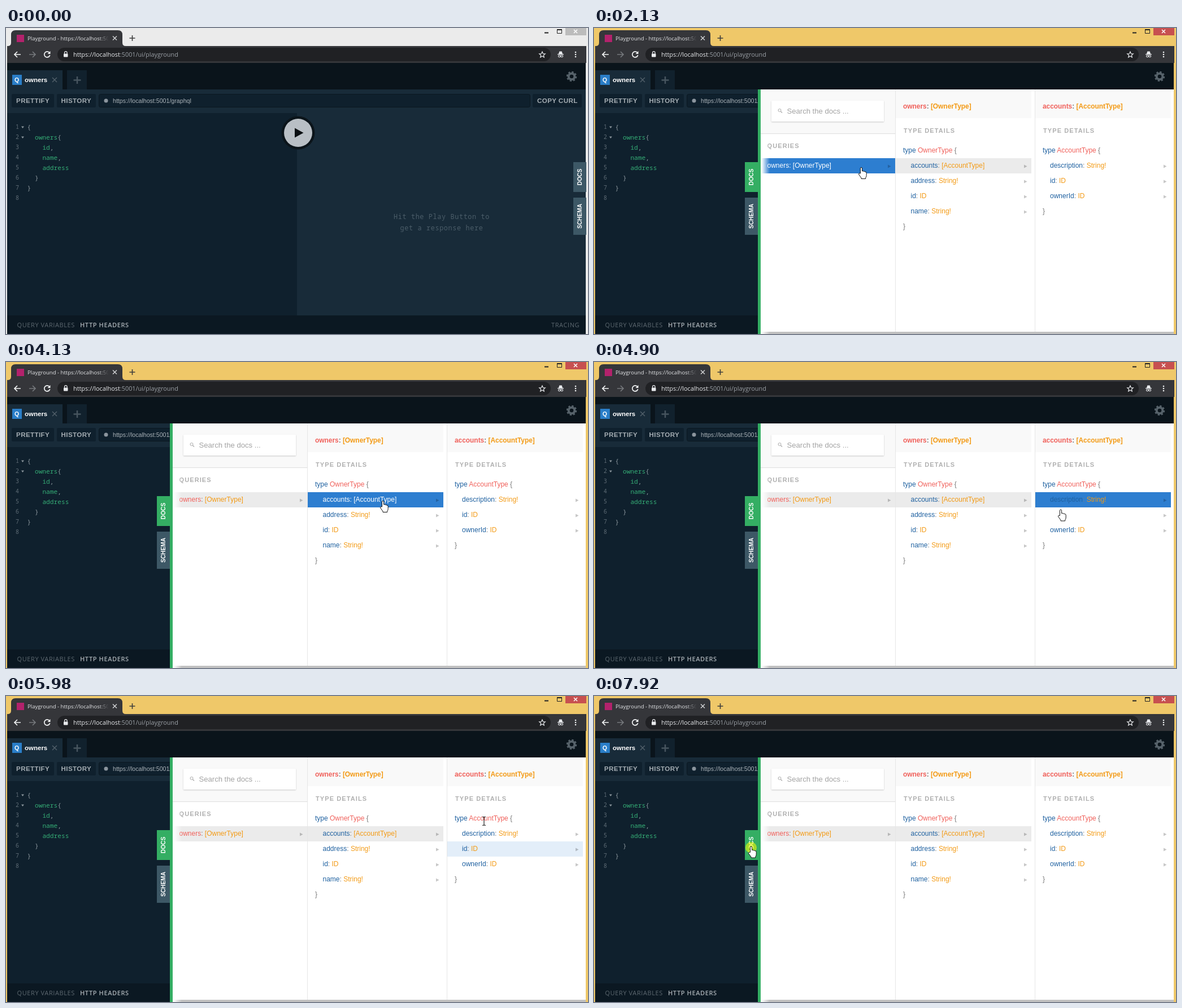
Recreate the animation shown at these times as an HTML page. Size 1030x543 px, loop 7990 ms.

```html
<!DOCTYPE html>
<html lang="en">
<head>
<meta charset="utf-8">
<title>Playground docs</title>
<style>
html, body { margin: 0; width: 100%; height: 100%; overflow: hidden; }
svg { display: block; width: 1030px; height: 543px; font-family: "Liberation Sans", Arial, sans-serif; }
.ui { font-family: "Open Sans", "Noto Sans", sans-serif; }
.mono { font-family: "Noto Sans Mono", monospace; }
.bold { font-weight: 700; }
.semi { font-weight: 600; }
.button { font-weight: 700; letter-spacing: .4px; }
.footer { font-family: "Open Sans", sans-serif; letter-spacing: .6px; }
.heading { font-weight: 700; letter-spacing: 1.1px; }
.hint { font-family: "Noto Sans Mono", monospace; letter-spacing: .65px; text-anchor: middle; }
.side { font-weight: 700; text-anchor: middle; }
.hot tspan { fill: #fff; }
</style>
</head>
<body>
<svg id="stage" viewBox="0 0 1030 543"></svg>
<script>
const LOOP = 7990, STEP = 76.9, FIRST = 430;
const ACTIVATE = 9, OPEN = 11;
const RED = '#f0605a', ORANGE = '#f39a14', BLUE = '#1f61a0', GREEN = '#34ae63', GREY = '#777';

const rect = (x, y, x2, y2, fill, extra = '') =>
  `<rect x="${x}" y="${y}" width="${x2 - x}" height="${y2 - y}" fill="${fill}" ${extra}/>`;
const circle = (x, y, r, fill, extra = '') => `<circle cx="${x}" cy="${y}" r="${r}" fill="${fill}" ${extra}/>`;
const line = (d, stroke, width = 1, extra = '') =>
  `<path d="${d}" fill="none" stroke="${stroke}" stroke-width="${width}" ${extra}/>`;
const shape = (d, fill, extra = '') => `<path d="${d}" fill="${fill}" ${extra}/>`;
const text = (x, y, content, size, fill, cls = '', extra = '') =>
  `<text x="${x}" y="${y}" font-size="${size}" fill="${fill}" class="${cls}" ${extra}>${content}</text>`;
const span = (content, fill) => `<tspan fill="${fill}">${content}</tspan>`;
const field = (name, type, color) => span(name, color) + span(': ', GREY) + span(type, ORANGE);

function browser() {
  return rect(0, 0, 1030, 543, '#ebebeb', 'id="frame"') +
    rect(990, 0, 1027, 13, '#bcbcbc', 'id="close"') +
    line('M1005 3l6 6M1011 3l-6 6', '#fff', 1.5) +
    line('M953 8.5h7', '#222', 2) + line('M975.5 3v6.5h8V3z', '#222') + line('M975 3h9', '#222', 2) +
    shape('M3 32q6 0 6-6V12q0-8 8-8H198q8 0 8 8V26q0 6 6 6z', '#35363a') +
    rect(2, 32, 1027, 62, '#35363a') +
    rect(19, 12, 32, 25, '#b3226c') +
    text(38, 21.5, 'Playground - https://localhost:50', 9.55, '#e4e6e8', 'ui') +
    rect(164, 8, 185, 28, 'url(#tabFade)') +
    line('M189 14.5l7 7M196 14.5l-7 7', '#d5d7d9', 1.4) +
    line('M218.500 18h10M223.500 13v10', '#3c3c3c', 1.6) +
    line('M26 47H15.500M20 42l-5 5 5 5', '#f1f3f4', 1.7) +
    line('M41 47H51.500M47 42l5 5-5 5', '#75787c', 1.7) +
    line('M76.500 43.500A5 5 0 1 0 77.700 48', '#f1f3f4', 1.7) + shape('M78.500 41v5h-5z', '#f1f3f4') +
    rect(91, 35, 964, 59, '#202124', 'rx="12"') +
    rect(102, 45.500, 109.500, 51.500, '#e8eaed', 'rx="1"') +
    line('M103.500 46v-2a2.300 2.300 0 0 1 4.600 0v2', '#e8eaed', 1.2) +
    text(119, 51, span('https://localhost', '#e8eaed') + span(':5001/ui/playground', '#9aa0a6'), 10.9, '', 'ui') +
    line('M949 42l1.500 3.500 3.800.300-2.900 2.500.900 3.700-3.300-2-3.300 2 .900-3.700-2.900-2.500 3.800-.300z', '#e8eaed', 1.2) +
    shape('M978 46l1.300-4.500h4.400L985 46zM976 46h11v1.300H976z', '#e8eaed') +
    line('M979.300 48.200a1.800 1.800 0 1 0 .100 0M983.700 48.200a1.800 1.800 0 1 0 .100 0', '#e8eaed', 1.1) +
    [43, 47, 51].map(y => circle(1008, y, 1.3, '#f1f3f4')).join('');
}

function editor() {
  const code = [
    [0, span('{', '#8b959d')],
    [2, span('owners', '#35ad76') + span('{', '#8b959d')],
    [4, span('id', '#35ad76') + span(',', '#8b959d')],
    [4, span('name', '#35ad76') + span(',', '#8b959d')],
    [4, span('address', '#35ad76')],
    [2, span('}', '#8b959d')],
    [0, span('}', '#8b959d')],
    [0, '']
  ];
  return rect(2, 151, 515, 510, '#0f202d') + rect(515, 151, 1026, 510, '#182b39') +
    code.map(([indent, content], i) =>
      text(17, 178.500 + 18 * i, i + 1, 10, '#5f6c76', 'mono') +
      text(37.500 + 6.72 * indent, 180 + 18 * i, content, 11.2, '', 'mono')).join('') +
    [176, 194].map(y => shape(`M27 ${y - 1.5}h5l-2.500 3.500z`, '#8b959d')).join('') +
    text(771, 339, 'Hit the Play Button to', 11.8, '#4b5d69', 'hint') +
    text(771, 359, 'get a response here', 11.8, '#4b5d69', 'hint') +
    circle(517, 186, 29.5, '#0b141a') + circle(517, 186, 25, '#b9bfc5') +
    shape('M511 177.500v17l15.500-8.500z', '#0b0f12');
}

function playground() {
  const button = (x, x2, tx, label) => rect(x, 117, x2, 141, '#0f202d', 'rx="2"') +
    text(tx, 132.500, label, 11.6, '#a5adb3', 'button');
  return rect(2, 62, 1026, 109, '#0a141b') +
    rect(2, 75, 100, 109, '#182b39') + rect(11, 83, 28, 101, '#2a7ec8') +
    text(15, 96, 'Q', 10.5, '#fff', 'bold') + text(33, 96, 'owners', 11.5, '#fff', 'bold') +
    line('M82 88l8 8M90 88l-8 8', '#54626c', 1.4) +
    rect(108, 75, 143, 109, '#11212d') + line('M119.500 92.500h13M126 86v13', '#47555f', 2.5) +
    circle(1001, 86, 5.3, 'none', 'stroke="#56626a" stroke-width="4"') +
    circle(1001, 86, 7.7, 'none', 'stroke="#56626a" stroke-width="3" stroke-dasharray="3.200 2.848"') +
    rect(2, 109, 1026, 151, '#182b39') +
    button(10, 85, 18, 'PRETTIFY') + button(90, 159, 97.5, 'HISTORY') + button(932, 1019, 940, 'COPY CURL') +
    rect(164.5, 117.5, 927.5, 140.5, '#0f202d', 'rx="3" stroke="#0a1720"') +
    circle(177, 129, 4, '#8b959e', 'id="pulse"') + circle(177, 129, 3.5, '#8b959e') +
    text(189, 132.500, 'https://localhost:5001/graphql', 10.64, '#a9b1b7') +
    editor() +
    rect(2, 510, 1026, 543, '#0b1822') +
    text(19.500, 530.500, 'QUERY VARIABLES', 11, '#5d6870', 'footer') +
    text(131, 530.500, 'HTTP HEADERS', 11, '#a9b0b5', 'footer semi') +
    text(965, 530.500, 'TRACING', 11, '#5d6870', 'footer');
}

// x, right edge, y, text x, name, type, name colour, selected
const rows = [
  [295, 533, 231, 306.5, 'owners', '[OwnerType]', RED, 1],
  [534, 774, 231, 560.5, 'accounts', '[AccountType]', BLUE, 1],
  [534, 774, 258, 560.5, 'address', 'String!', BLUE],
  [534, 774, 285, 560.5, 'id', 'ID', BLUE],
  [534, 774, 312, 560.5, 'name', 'String!', BLUE],
  [781, 1021, 231, 807, 'description', 'String!', BLUE],
  [781, 1021, 258, 807, 'id', 'ID', BLUE],
  [781, 1021, 285, 807, 'ownerId', 'ID', BLUE]
];

function row([x, x2, y, tx, name, type, color, selected]) {
  return '<g class="row">' + rect(x, y, x2, y + 27, selected ? '#ebebeb' : '#fff') +
    rect(x, y, x2, y + 27, '#2d7ed0', 'opacity="0" class="glow"') +
    text(tx, y + 17, field(name, type, color), 12) +
    shape(`M${x2 - 13} ${y + 11.500}v6l5.500-3z`, '#000', 'opacity=".22"') + '</g>';
}

function docs() {
  const column = (x, name, type, end) => rect(x, 109, x + 240, 160, '#f9f9f9') +
    text(x + 13, 143, field(name, `[${type}]`, RED), 11.9, '', 'bold') +
    text(x + 14, 186, 'TYPE DETAILS', 11, '#b0b0b0', 'heading') +
    text(x + 13, 221, span('type ', BLUE) + span(type, RED) + span(' {', GREY), 12) +
    text(x + 13, end, '}', 12, GREY);
  return rect(295, 109, 1026, 543, '#fff') + rect(295, 109, 533, 187, '#f9f9f9') +
    line('M295 187.500H533', '#dedede') +
    rect(314, 129, 513, 166, '#fff', 'rx="1" filter="url(#soft)"') +
    circle(328.5, 146, 2.5, 'none', 'stroke="#aaa"') + line('M330.500 148l2.500 2.500', '#aaa', 1.2) +
    text(341.500, 151.500, 'Search the docs ...', 13.1, '#a3a3a3') +
    text(306.500, 213, 'QUERIES', 11, '#b0b0b0', 'heading') +
    column(534, 'owners', 'OwnerType', 356) + column(781, 'accounts', 'AccountType', 329) +
    rows.map(row).join('') +
    line('M533.500 109V539M780.500 109V539', '#e6e6e6') +
    rect(295, 539, 1026, 543, '#c1c1c1') +
    rect(295, 188, 311, 543, 'url(#edgeFade)') +
    rect(290, 109, 295, 543, GREEN);
}

function sideTabs() {
  const tab = (y, y2, label, extra) => rect(0, y, 23, y2, '#3d5866', extra) +
    text(0, 0, label, 10.2, '#fff', 'side', `transform="translate(15 ${(y + y2) / 2}) rotate(-90)"`);
  return '<g id="tabs">' + tab(238, 291, 'DOCS', 'id="docsTab"') + tab(301, 367, 'SCHEMA') + '</g>';
}

const stage = document.getElementById('stage');
stage.innerHTML = `<defs>
  <linearGradient id="tabFade"><stop stop-color="#35363a" stop-opacity="0"/><stop offset=".85" stop-color="#35363a"/></linearGradient>
  <linearGradient id="edgeFade"><stop offset=".1" stop-color="#fff"/><stop offset="1" stop-color="#fff" stop-opacity="0"/></linearGradient>
  <filter id="soft" x="-5%" y="-15%" width="110%" height="140%"><feDropShadow dx="0" dy="1" stdDeviation="1.2" flood-opacity=".2"/></filter>
  </defs>` + browser() + playground() + `<g id="docs">${docs()}</g>` + sideTabs() +
  circle(0, 0, 10, '#ff0', 'id="click" opacity=".55"') +
  '<g id="cursor">' +
  shape('M0 0V13.500L3.100 10.800 5.300 16 7.600 15 5.400 9.900H9.400Z', '#fff', 'stroke="#111" id="arrow"') +
  shape('M-1.600 8.500V-.4a1.600 1.600 0 0 1 3.200 0V4.500q1.600-1 2.800.6 1.600-.8 2.600.7 2.200-.3 2.200 2V12q0 2.500-1.500 4.200V18H0V16.500L-4.300 10.500q-.8-2 1-2.200z',
    '#fff', 'stroke="#111" id="hand"') +
  line('M-3-7.500h2l1 .8 1-.8h2M0-6.500V6.500M-3 7.500h2l1-.8 1 .8h2', '#222', 1.2, 'id="beam"') + '</g>';

const el = id => document.getElementById(id);
const show = (id, on) => el(id).setAttribute('display', on ? 'inline' : 'none');
const rowNodes = [...document.querySelectorAll('.row')];

// Pointer path: step, x, y
const path = [
  [0, 1024, 470], [7, 1019, 265], [10, 1021, 254], [12, 1021, 254], [19, 500, 251], [22, 473, 249.5],
  [27, 410, 254], [32, 440, 248], [34, 440, 248], [41, 661, 244], [45, 661, 244], [48, 667, 248.5],
  [52, 765, 202], [55, 832, 240], [57, 828, 251], [58, 826, 264], [62, 822, 292], [66, 820, 295],
  [68, 824, 299], [70, 836, 268], [71, 845, 226], [72, 846, 222], [73, 846, 219], [75, 846, 219],
  [79, 740, 290], [82, 655, 333], [85, 620, 326], [92, 278, 269], [99, 278, 269]
];

function pointer(step) {
  const i = Math.max(1, path.findIndex(p => p[0] >= step));
  const [s0, x0, y0] = path[i - 1], [s1, x1, y1] = path[i];
  const k = Math.max(0, (step - s0) / (s1 - s0));
  return [x0 + (x1 - x0) * k, y0 + (y1 - y0) * k];
}

const inside = ([px, py], x, y, x2, y2) => px >= x && px < x2 && py >= y && py < y2;
const hovers = (step, [x, x2, y]) => step >= OPEN && inside(pointer(step), x, y, x2, y + 27);

function render(now) {
  const t = now % LOOP, step = Math.floor((t - FIRST) / STEP);
  const active = step >= ACTIVATE, open = step >= OPEN, at = pointer(step);

  el('frame').setAttribute('fill', active ? '#efc869' : '#ebebeb');
  el('close').setAttribute('fill', active ? '#c75050' : '#bcbcbc');
  show('docs', open);
  el('tabs').setAttribute('transform', `translate(${open ? 267 : 1004})`);
  el('docsTab').setAttribute('fill', open ? GREEN : '#3d5866');

  // Schema polling blinks every two seconds
  const beat = Math.min(1, (t + 760) % 2000 / 400);
  el('pulse').setAttribute('r', 4 + 4 * Math.sqrt(beat));
  el('pulse').setAttribute('opacity', .5 * (1 - beat));

  // Row text switches at once, its background lags behind
  let overRow = false;
  rows.forEach((r, i) => {
    const hot = hovers(step, r);
    overRow = overRow || hot;
    rowNodes[i].classList.toggle('hot', hot);
    rowNodes[i].querySelector('.glow').setAttribute('opacity',
      .87 * hovers(step - 1, r) + .13 * hovers(step - 2, r));
  });

  const tabX = open ? 267 : 1004;
  const hand = overRow || inside(at, tabX, 238, tabX + 23, 291);
  const beam = open && !hand && [[547, 643], [794, 898]].some(([x, x2]) =>
    inside(at, x, 208, x2, 228) || inside(at, x, 175, x2, 189));
  show('hand', hand);
  show('beam', beam);
  show('arrow', !hand && !beam);
  show('cursor', step >= 0);
  el('cursor').setAttribute('transform', `translate(${at})`);
  el('click').setAttribute('transform', `translate(${at})`);
  show('click', [[ACTIVATE, OPEN], [43, 45], [97, 99]].some(([a, b]) => step >= a && step < b));
}

const start = performance.now();
function tick() {
  render(performance.now() - start);
  requestAnimationFrame(tick);
}
tick();
</script>
</body>
</html>
```
